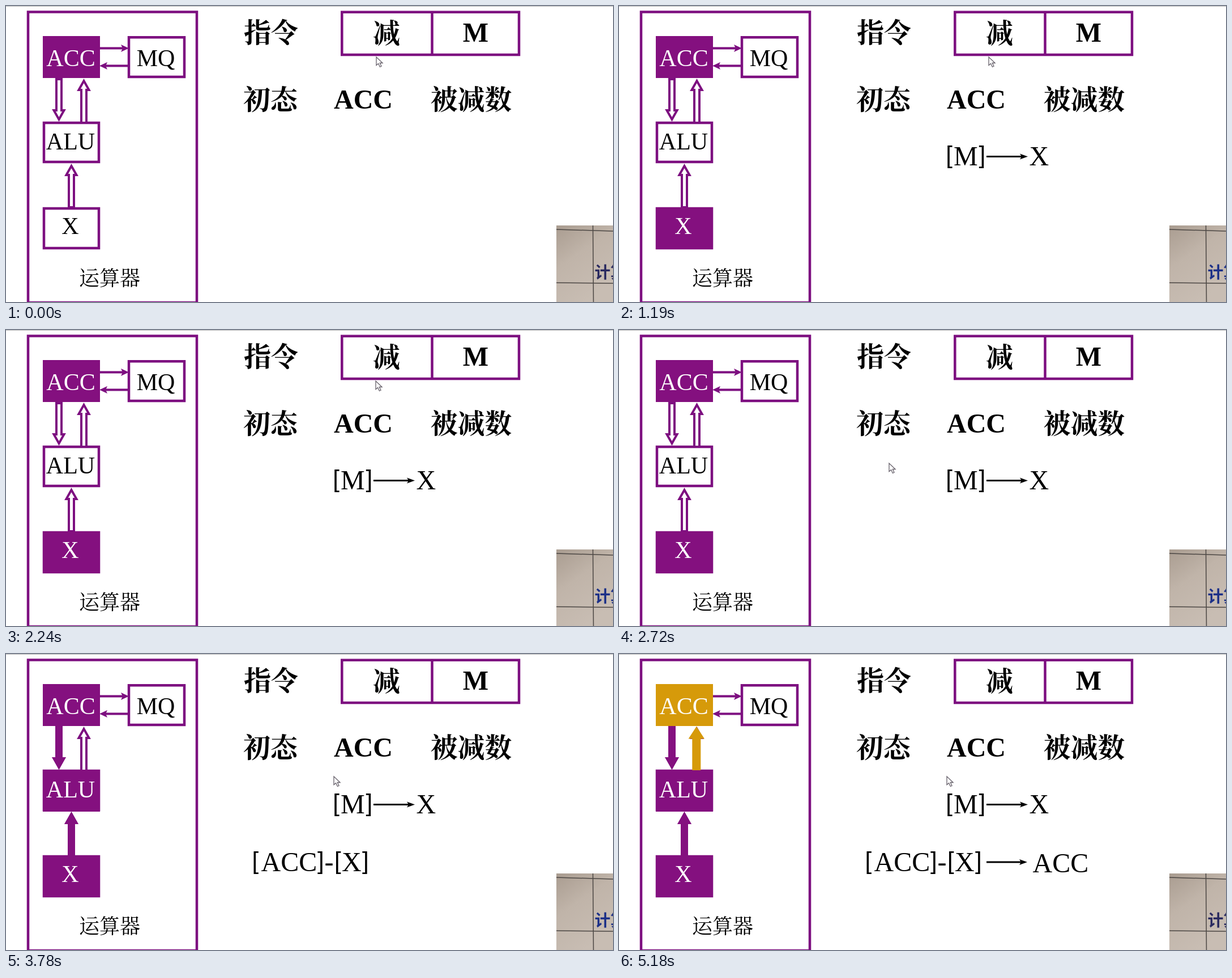
These frames come from a looping animation (1072 by 522 pixels, 5250 ms). An HTML page:

```html
<!DOCTYPE html>
<html lang="zh">
<head>
<meta charset="utf-8">
<style>
html, body { margin: 0; width: 100%; height: 100%; overflow: hidden; background: #fff; }
svg { display: block; }
text { font-family: "Liberation Serif", "Noto Serif CJK SC", "Noto Sans CJK SC", "Noto Sans CJK", serif; font-size: 48px; }
.box { fill: none; stroke: #7d0f80; stroke-width: 4.5; }
.arrow { fill: #fff; stroke: #7d0f80; stroke-width: 4; }
.full { fill: #84107f; stroke: #84107f; }
.gold { fill: #d69a0a; stroke: #d69a0a; }
.label { font-size: 42px; text-anchor: middle; }
.light { fill: #fff; }
.bold { font-weight: bold; }
.bracket { font: 42px "Liberation Sans", sans-serif; }
</style>
</head>
<body>
<svg width="1072" height="522" viewBox="0 0 1072 522">
  <defs>
    <clipPath id="clip0"><path/></clipPath>
    <clipPath id="clip1"><path/></clipPath>
    <clipPath id="clip2"><path/></clipPath>
    <clipPath id="wall"><path d="M972 387h100v135h-100z"/></clipPath>
    <linearGradient id="tile" x1="0" y1="0" x2=".5" y2="1">
      <stop offset="0" stop-color="#a99c90"/>
      <stop offset=".45" stop-color="#c0b4a9"/>
      <stop offset="1" stop-color="#c8bdb3"/>
    </linearGradient>
  </defs>

  <path d="M0 .5H1072" stroke="#b8b8b8"/>
  <path class="box" d="M39 10.5H337V523H39Z"/>
  <path class="box" d="M593.3 10.8H906V86H593.3ZM752.5 11V86"/>
  <path class="box" d="M217 55.3H315V125H217ZM67 206H164V275H67ZM67 357H164V427H67Z"/>
  <path class="full" d="M66 54H165V126H66Z" stroke-width="2"/>
  <path class="box" d="M166 74.5H208M216 105.5H174" style="stroke-width:4"/>
  <path d="M217 74.5L203 68L206 74.5L203 81ZM165 105.5L179 99L176 105.5L179 112Z" fill="#7d0f80"/>
  <g id="hollow"></g>

  <text class="label light" x="114.5" y="106">ACC</text>
  <text class="label" x="264.5" y="106">MQ</text>
  <text class="label" x="114" y="253">ALU</text>
  <text class="label" x="113.5" y="402">X</text>
  <text x="129" y="492.5" style="font-size:36px;font-weight:500">运算器</text>

  <g class="bold">
    <text x="420" y="63.5">指令</text>
    <text x="648" y="65">减</text>
    <text x="829.5" y="63" text-anchor="middle">M</text>
    <text x="419" y="182">初态</text>
    <text x="579" y="181">ACC</text>
    <text x="750" y="182" style="font-size:47.7px">被减数</text>
  </g>

  <g clip-path="url(#clip0)">
    <path class="full" d="M66 356H165V428H66Z" stroke-width="2"/>
    <text class="label light" x="113.5" y="402">X</text>
    <text class="bracket" x="577.3 635.5" y="277">[]</text>
    <text x="591" y="281">M</text>
    <path d="M649 265.5H712" stroke="#000" stroke-width="3"/>
    <path d="M722 265.5L708 260.5L711 265.5L708 270.5Z"/>
    <text x="724.5" y="281">X</text>
  </g>

  <g clip-path="url(#clip1)">
    <g id="filled"></g>
    <path class="full" d="M66 205H165V277H66Z" stroke-width="2"/>
    <text class="label light" x="114" y="253">ALU</text>
    <text class="bracket" x="434.5 550 580 629" y="379">[][]</text>
    <text x="450.5" y="383">ACC</text>
    <text x="562.5 593" y="383">-X</text>
  </g>

  <g clip-path="url(#clip2)">
    <path class="gold" d="M66 54H165V126H66Z" stroke-width="2"/>
    <text class="label light" x="114.5" y="106">ACC</text>
    <g id="result"></g>
    <path d="M649 367H711" stroke="#000" stroke-width="3"/>
    <path d="M721 367L707 362L710 367L707 372Z"/>
    <text x="730.5" y="385">ACC</text>
  </g>

  <g clip-path="url(#wall)">
    <path d="M972 387h100v135h-100z" fill="url(#tile)"/>
    <path d="M972 394L1072 397M1036.5 387L1037.5 522M972 488L1072 489" fill="none" stroke="#4b4643" stroke-width="1.5"/>
    <text id="sign" x="1039.5" y="479.5" style="font:bold 28px 'Noto Sans CJK SC','Noto Sans CJK',sans-serif">计算</text>
  </g>

  <path id="cursor" d="M0 0V14.5L3.6 11.5L6.4 17.5L9 16.3L6.3 10.5H11Z" fill="#fff" stroke="#66606a" stroke-width="1.3"/>
</svg>
<script>
const LOOP = 5250;
const $ = id => document.getElementById(id);

// Vertical block arrow; dir is +1 when the tail lies below the tip
function arrow(x, tip, end, dir, cls, shaft = 4.5, head = 9) {
  const neck = tip + 20 * dir;
  return `<path class="arrow ${cls}" d="M${x - shaft} ${end}V${neck}H${x - head}L${x} ${tip + 4 * dir}L${x + head} ${neck}H${x + shaft}V${end}Z"/>`;
}
$('hollow').innerHTML = arrow(93.5, 204, 129, -1, '') + arrow(137.5, 128, 206, 1, '') + arrow(115.5, 278, 355, 1, '');
$('filled').innerHTML = arrow(93.5, 204, 127, -1, 'full') + arrow(115.5, 278, 355, 1, 'full');
$('result').innerHTML = arrow(136.8, 127.5, 203, 1, 'gold', 5.5, 10.5);

// Venetian blinds: six slats of one height, each opening downwards
const blinds = [
  { start: 655, span: 500, top: 216.3, slat: 37.3 },
  { start: 3100, span: 500, top: 126, slat: 46 },
  { start: 4020, span: 480, top: 52, slat: 59 }
];
const stops = [[0, 654, 90], [400, 653, 90], [2300, 653, 90], [2680, 477, 235], [2800, 477, 235], [3080, 579, 216], [LOOP, 579, 216]];

const clamp = v => Math.max(0, Math.min(1, v));
const smooth = v => v * v * (3 - 2 * v);

function cursorAt(t) {
  const i = stops.findIndex(s => s[0] > t);
  const [t0, x0, y0] = stops[i - 1], [t1, x1, y1] = stops[i];
  const k = smooth((t - t0) / (t1 - t0));
  return [x0 + (x1 - x0) * k, y0 + (y1 - y0) * k];
}

function draw(now) {
  const t = now % LOOP;
  blinds.forEach((b, n) => {
    const open = clamp((t - b.start) / b.span);
    let d = '';
    if (open === 1) d = 'M0 0H1072V522H0Z';
    else if (open > 0) for (let i = 0; i < 6; i++) d += `M0 ${b.top + i * b.slat}h1072v${open * b.slat}h-1072z`;
    $('clip' + n).firstChild.setAttribute('d', d);
  });
  $('cursor').setAttribute('transform', `translate(${cursorAt(t)})`);
  $('sign').setAttribute('fill', t > 350 && t < 4900 ? '#1c3088' : '#29295f');
  requestAnimationFrame(draw);
}
requestAnimationFrame(draw);
</script>
</body>
</html>
```
